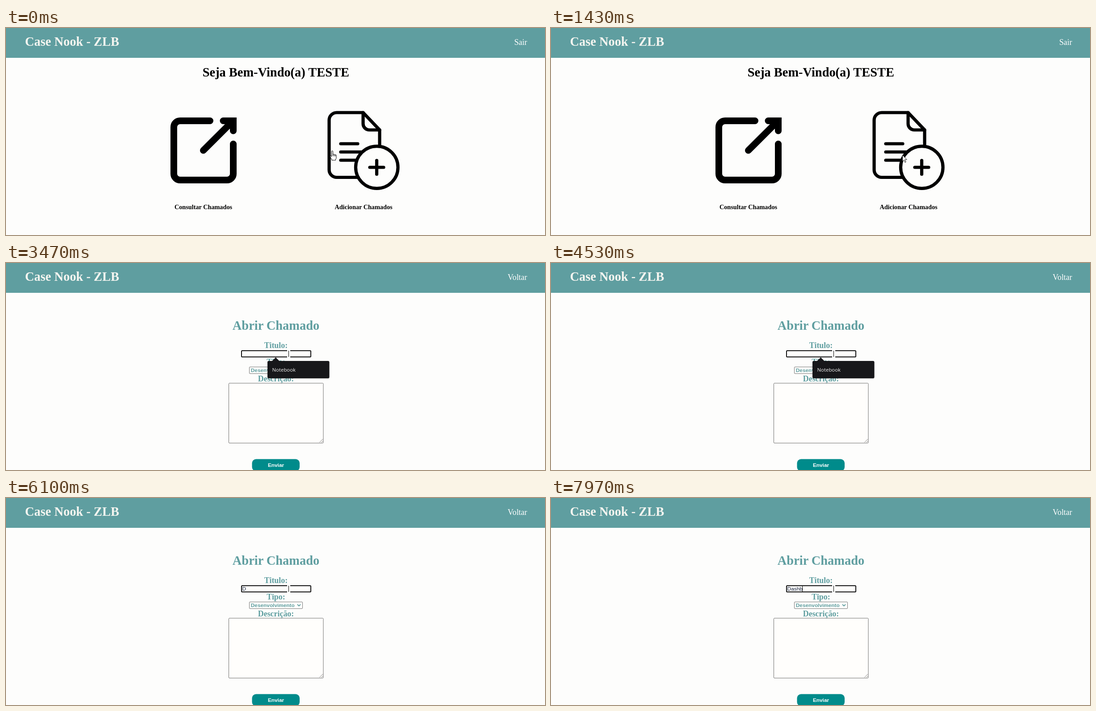
An HTML page for the animation above (8000 ms loop, 1206 by 465 pixels).

```html
<!DOCTYPE html>
<html lang="pt-BR">
<head>
<meta charset="utf-8">
<title>Chamados</title>
<style>
  html, body { margin: 0; width: 100%; height: 100%; overflow: hidden; background: #fdfdfc; }
  svg { display: block; width: 100%; height: 100%; }
  text { font-family: "Liberation Serif", "Times New Roman", serif; }
  .h1 { font-size: 28.4px; font-weight: bold; }
  .label { font-size: 17.9px; font-weight: bold; }
  .caption { font-size: 14.25px; font-weight: bold; }
  .link { font-size: 17.9px; fill: #fff; text-anchor: end; }
  .mid { text-anchor: middle; }
  .teal { fill: #5f9ea0; }
  .ui { font: 11.83px "Liberation Sans", Arial, sans-serif; }
  .strong { font-weight: bold; }
  .hint { font: 11.4px "Open Sans", "Noto Sans", sans-serif; fill: #f4f4f4; }
  .icon { fill: none; stroke: #000; stroke-linecap: round; }
  .pointer { fill: #fff; stroke: #000; stroke-linejoin: round; }
</style>
</head>
<body>
<svg viewBox="0 0 1206 465">
  <rect width="1206" height="465" fill="#fdfdfc"/>
  <rect width="1206" height="67" fill="#5f9ea0"/>
  <text class="h1" x="42.5" y="39.5" fill="#f5f5f0">Case Nook - ZLB</text>
  <text class="link" id="link" x="1166" y="38.3"></text>

  <g id="menu">
    <text class="h1 mid" x="603.8" y="108.7">Seja Bem-Vindo(a) TESTE</text>
    <g class="icon" stroke-width="15">
      <path d="M456.5 208.5H389.5a14 14 0 0 0-14 14V327.5a14 14 0 0 0 14 14H494.5a14 14 0 0 0 14-14V260.5"/>
      <path d="M486 208.5H508.5V231M441.5 275L507 209.5"/>
    </g>
    <g class="icon" stroke-width="7.2" stroke-linejoin="round">
      <path d="M787 335.5H740a17 17 0 0 1-17-17V207a17 17 0 0 1 17-17H799L836 229V264"/>
      <path d="M799 190V215a14 14 0 0 0 14 14H836"/>
      <path d="M749 260H787M749 278.5H797M749 297H784"/>
      <circle cx="829.7" cy="313" r="47.3" fill="#fdfdfc"/>
      <path d="M814 313H845M829.5 297.5V328.5"/>
    </g>
    <text class="caption mid" x="441.5" y="406.5">Consultar Chamados</text>
    <text class="caption mid" x="800" y="406.5">Adicionar Chamados</text>
  </g>

  <g id="form">
    <text class="h1 mid teal" x="604" y="150.3">Abrir Chamado</text>
    <text class="label mid teal" x="604" y="191">Titulo:</text>
    <text class="label mid teal" x="604" y="228.3">Tipo:</text>
    <text class="label mid teal" x="604" y="265.5">Descrição:</text>

    <rect id="field" x="527" y="197" width="155" height="14" rx="1.5" fill="#fffefc"/>
    <text class="ui" id="typed" x="528.6" y="208" fill="#14203c"></text>
    <path id="caret" stroke="#000" d="M0 198V210.5"/>

    <rect x="544.5" y="233.5" width="119" height="15" rx="1.5" fill="#fffefc" stroke="#767676"/>
    <text class="ui strong teal" x="547.8" y="245">Desenvolvimento</text>
    <path d="M652 239L655.5 242.5L659 239" fill="none" stroke="#5f9ea0" stroke-width="1.8"/>

    <rect x="498.5" y="270" width="211.5" height="134.5" rx="1.5" fill="#fffefc" stroke="#6e6e6e"/>
    <path d="M701.5 403L709 395.5M706 403L709 400" stroke="#666" stroke-width=".9"/>

    <rect x="550.5" y="440.5" width="106.5" height="27" rx="9" fill="#008b8b"/>
    <text class="ui strong mid" x="604" y="458" fill="#fff">Enviar</text>

    <g id="popup">
      <rect x="585" y="221" width="139" height="40" rx="4" fill="#000" opacity=".1"/>
      <path d="M594.5 221L603.5 212L612.5 221Z" fill="#17171a"/>
      <rect x="585" y="220" width="138.5" height="39" rx="3" fill="#17171a"/>
      <text class="hint" x="595.5" y="244.3">Notebook</text>
    </g>
  </g>

  <g id="cursor">
    <path id="hand" class="pointer" d="M-1.5 1.3Q-1.5 0 0 0T1.5 1.3V8Q3 6.8 4.2 8.3Q5.6 7.3 6.7 8.8Q8.6 8.2 9 10V15Q9 17.5 7.5 19V21H-1V19Q-4 15.5-4.5 12.5Q-4.5 10.5-3 11L-1.5 13ZM1.5 8V12M4.2 8.3V12M6.7 8.8V12.5"/>
    <path id="arrow" class="pointer" stroke-width=".9" d="M.5 .5V14.5L3.7 11.5L6 17L8.2 16L5.9 10.7H10.3Z"/>
    <g id="beam" fill="none">
      <path stroke="#fff" stroke-width="2" d="M-3 -7H4M-3 7H4"/>
      <path stroke="#000" d="M.5 -7V7"/>
    </g>
  </g>
</svg>
<script>
const LOOP = 8000, PAGE = 1500, FOCUS = 1800, BLINK = 500;
const KEYS = [[5540, "D"], [6620, "a"], [6960, "s"], [7300, "h"], [7760, "b"]];
const PATH = [[100, 730, 276], [1000, 786, 285], [PAGE, 786, 285], [FOCUS, 632, 204]];

const el = {};
document.querySelectorAll("[id]").forEach(node => el[node.id] = node);

const ramp = (t, start, length) => Math.min(1, Math.max(0, (t - start) / length));
const ease = p => p * p * (3 - 2 * p);
const show = (node, on) => node.setAttribute("visibility", on ? "inherit" : "hidden");

function cursorAt(t) {
  let [, x, y] = PATH[0];
  for (let i = 1; i < PATH.length; i++) {
    const [start, x0, y0] = PATH[i - 1], [end, x1, y1] = PATH[i];
    const p = ease(ramp(t, start, end - start));
    x += (x1 - x0) * p;
    y += (y1 - y0) * p;
  }
  return [x, y];
}

function render(t) {
  const onForm = t >= PAGE, focused = t >= FOCUS;
  show(el.menu, !onForm);
  show(el.form, onForm);
  el.link.textContent = onForm ? "Voltar" : "Sair";

  el.field.setAttribute("stroke", focused ? "#101010" : "#767676");
  el.field.setAttribute("stroke-width", focused ? 2 : 1);

  const pressed = KEYS.filter(([time]) => t >= time);
  el.typed.textContent = pressed.map(([, letter]) => letter).join("");
  const lastInput = pressed.length ? pressed[pressed.length - 1][0] : FOCUS;
  const width = pressed.length ? el.typed.getComputedTextLength() : 0;
  el.caret.setAttribute("transform", `translate(${Math.floor(528.6 + width) + .5} 0)`);
  show(el.caret, focused && (t - lastInput) % (2 * BLINK) < BLINK);

  el.popup.setAttribute("opacity", ramp(t, 1840, 120) * (1 - ramp(t, KEYS[0][0], 170)));

  el.cursor.setAttribute("transform", `translate(${cursorAt(t)})`);
  show(el.hand, t < 1300);
  show(el.arrow, t >= 1300 && t < 1770);
  show(el.beam, t >= 1770);
}

function tick() {
  render(performance.now() % LOOP);
  requestAnimationFrame(tick);
}
tick();
</script>
</body>
</html>
```
